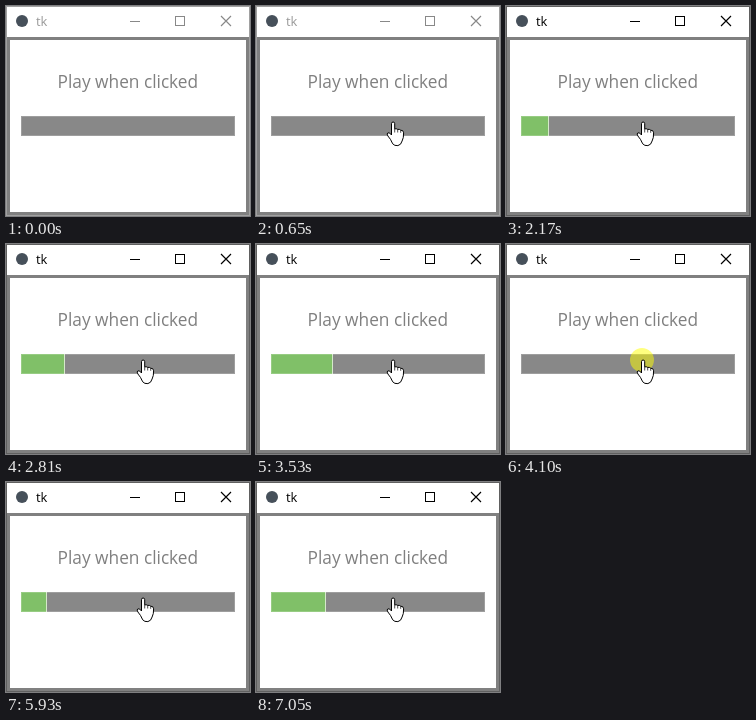
An HTML page for the animation above (7.07 s loop, 244 by 210 pixels).

```html
<!DOCTYPE html>
<html lang="en">
<head>
<meta charset="utf-8">
<title>Progress bar</title>
<style>
  html, body { margin: 0; width: 100%; height: 100%; overflow: hidden; background: #fff; }
  svg { display: block; width: 244px; height: 210px; }
  .title { font: 13px "Open Sans", sans-serif; }
  .label { font: 17.3px "Open Sans", sans-serif; fill: #808080; }
</style>
</head>
<body>
<svg viewBox="0 0 244 210">
  <rect width="244" height="210" fill="#fff"/>
  <path d="M0 31H244V210H0ZM4 34V206H240V34Z" fill="#808080" fill-rule="evenodd"/>
  <rect id="frame" x=".5" y=".5" width="243" height="209" fill="none"/>
  <circle cx="16" cy="15" r="6" fill="#46505a"/>
  <text id="title" class="title" x="30" y="20">tk</text>
  <g id="buttons" fill="none">
    <path d="M124 15.5h10M169.5 10.5h9v9h-9z" shape-rendering="crispEdges"/>
    <path d="M215 10l10 10m0-10l-10 10" stroke-width="1.15"/>
  </g>
  <text class="label" x="51.5" y="82">Play when clicked</text>
  <rect x="15" y="110" width="214" height="20" fill="#888"/>
  <rect id="fill" x="15" y="110" height="20" fill="#80c068"/>
  <rect id="edge" y="110" width="1" height="20" fill="#d5e9ca"/>
  <rect x="15.5" y="110.5" width="213" height="19" fill="none" stroke="#fff" stroke-opacity=".18"/>
  <circle id="press" cx="136" cy="116" r="12" fill="#ff0" fill-opacity=".5"/>
  <g id="hand" stroke="#000" stroke-linejoin="round">
    <path fill="#fff" d="M135.5 129V117.7q0-1.7 1.6-1.7t1.6 1.7v5.2q1.6-.5 3 .5q1.8-.4 3 .8q2.8-.2 2.9 2.6q.2 5.2-1.5 8.2q-1 4-4.2 4.6q-3.4 .4-5.2-1.8q-2-4.8-4.8-7.8q-1.6-2.4 0-3.2q1.8-.5 3.6 2.2z"/>
    <path fill="none" stroke-width=".7" d="M138.7 123v3.5M141.7 123.5v3M144.7 124.3v2.5"/>
  </g>
</svg>
<script>
const LOOP = 7070, ENTER = 510, ARRIVE = 650, HOLD = 120, SPEED = 0.0252;
const START = 1090, STOP = 4090, RESTART = 4900;
const $ = id => document.getElementById(id);
const set = (id, name, value) => $(id).setAttribute(name, value);
const show = (id, on) => set(id, "visibility", on ? "visible" : "hidden");

function draw(t) {
  const active = t >= START;
  set("frame", "stroke", active ? "#606060" : "#a0a0a0");
  set("title", "fill", active ? "#000" : "#999");
  set("buttons", "stroke", active ? "#000" : "#888");

  const begun = t >= RESTART ? RESTART : t >= START && t < STOP ? START : t;
  const width = Math.floor((t - begun) * SPEED);
  set("fill", "width", width);
  set("edge", "x", 15 + width);
  show("edge", width > 0);

  show("press", [START, STOP, RESTART].some(c => t >= c && t < c + HOLD));

  const left = 1 - Math.min(1, Math.max(0, (t - ENTER) / (ARRIVE - ENTER)));
  show("hand", t >= ENTER);
  set("hand", "transform", `translate(${-137 * left * left} ${left})`);
}

const origin = performance.now();
function tick() {
  draw((performance.now() - origin) % LOOP);
  requestAnimationFrame(tick);
}
tick();
</script>
</body>
</html>
```
